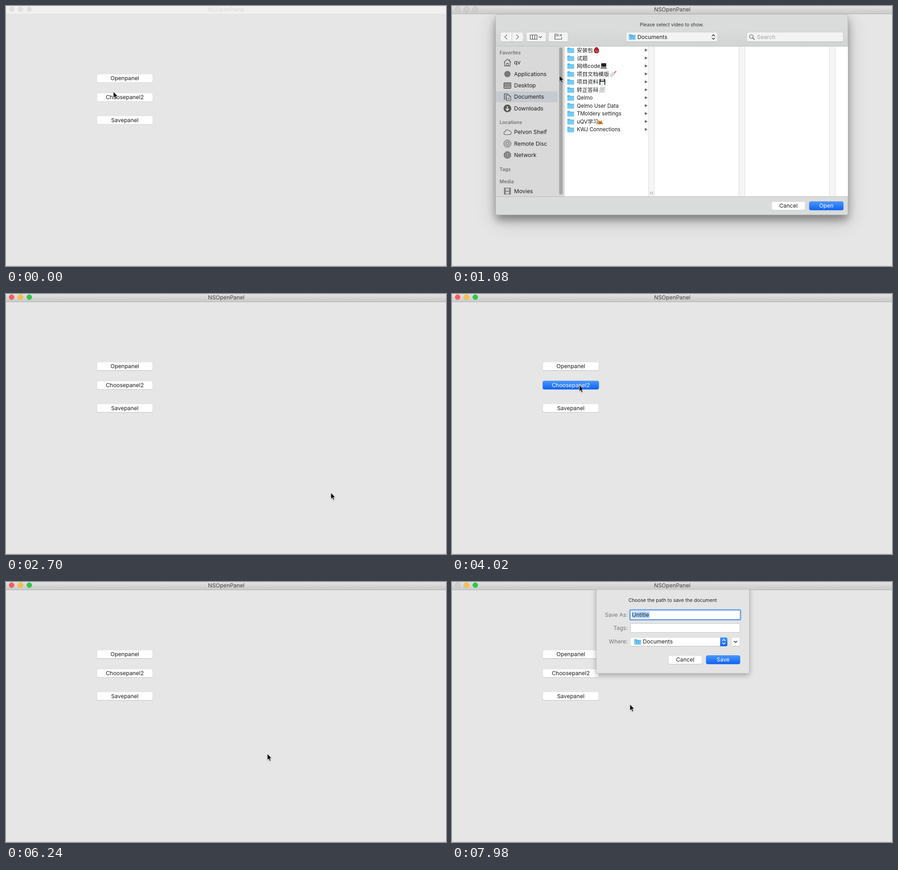
An HTML page for the animation above (8000 ms loop, 973 by 575 pixels).

```html
<!DOCTYPE html>
<html lang="en">
<head>
<meta charset="utf-8">
<title>File panels</title>
<style>
html, body { margin: 0; width: 100%; height: 100%; overflow: hidden; background: #e6e6e6; }
svg { display: block; width: 100%; height: 100%; }
text { font-family: Inter, "Noto Sans CJK SC", "Noto Sans CJK", sans-serif; white-space: pre; }
</style>
</head>
<body>
<svg id="stage" viewBox="0 0 973 575"></svg>
<script>
const stage = document.getElementById('stage');
const INK = '#1d1d1d';

// Markup helpers
const rect = (x, y, w, h, fill, extra = '') =>
  `<rect x="${x}" y="${y}" width="${w}" height="${h}" fill="${fill}" ${extra}/>`;
const circle = (x, y, r, fill, extra = '') =>
  `<circle cx="${x}" cy="${y}" r="${r}" fill="${fill}" ${extra}/>`;
const line = (d, color, w = 1, extra = '') =>
  `<path d="${d}" fill="none" stroke="${color}" stroke-width="${w}" ${extra}/>`;
const shape = (d, fill, extra = '') => `<path d="${d}" fill="${fill}" ${extra}/>`;
// y is the middle of the line of text
const label = (s, x, y, size = 12.3, fill = INK, extra = '') =>
  `<text x="${x}" y="${y + size * 0.36}" font-size="${size}" fill="${fill}" ${extra}>${s}</text>`;
const at = (x, y, body) => `<g transform="translate(${x} ${y})">${body}</g>`;
const MID = 'text-anchor="middle"';
const END = 'text-anchor="end"';
const ROUND = 'stroke-linecap="round" stroke-linejoin="round"';

const plate = (x, y, w, h, r = 3.5) =>
  rect(x, y + 0.7, w, h, '#b2b2b2', `rx="${r}"`) +
  rect(x, y, w, h, '#fff', `rx="${r}" stroke="#cfcfcf" stroke-width=".6"`);

// A push button with a white and a blue face; blueFirst marks the default one
const button = (id, text, x, y, w, h = 19, blueFirst = false) => {
  const cx = x + w / 2, cy = y + h / 2;
  const show = on => on ? '' : 'style="display:none"';
  return `<g id="${id}"><g class="white" ${show(!blueFirst)}>${plate(x, y, w, h)}` +
    label(text, cx, cy, 12.3, INK, MID) + `</g><g class="blue" ${show(blueFirst)}>` +
    rect(x, y, w, h, 'url(#blue)', 'rx="3.5" stroke="#2b78f0" stroke-width=".6"') +
    label(text, cx, cy, 12.3, '#fff', MID) + '</g></g>';
};

const folder = (x, y, w = 15) => at(x, y,
  shape(`M0 1Q0 0 1 0H5L6.5 1.6H${w - 1}Q${w} 1.6 ${w} 2.6V11Q${w} 12 ${w - 1} 12H1Q0 12 0 11Z`, '#56b5e8') +
  rect(0, 3, w, 9, '#76cbf7', 'rx="1"'));
const docFolder = (x, y) => folder(x, y) + at(x + 5, y + 4,
  line('M0 6V0H3L5 2V6', '#3b92d0', 1.1));

const upDown = (x, y, color) =>
  line(`M${x - 3} ${y - 2.3}l3 -3l3 3M${x - 3} ${y + 2.3}l3 3l3 -3`, color, 1.4, ROUND);

// Small pictures after some of the folder names
const pics = {
  bag: rect(1, 1, 11, 12, '#a82429', 'rx="4.5"') + rect(3, 6, 7, 5, '#d8434a', 'rx="1.5"') +
    line('M4 1.5Q6.5 -1 9 1.5', '#7c1518', 1.2),
  laptop: rect(2, 0, 11, 8, '#222', 'rx="1"') + shape('M1 9H13L15 12H0Z', '#6b6b6b'),
  tag: shape('M0 8L7 2L11 6L4 12L1 12Z', '#dedede', 'stroke="#a9a9a9" stroke-width=".6"') +
    line('M9 4L13 0', '#d8433f', 2),
  disk: rect(1, 0, 13, 13, '#32383e', 'rx="1"') + rect(4, 0, 7, 4, '#c9ced2') +
    rect(3, 6, 9, 7, '#eee'),
  page: shape('M3 0H14L12 9H1Z', '#e4e4e4', 'stroke="#aaa" stroke-width=".6"') +
    line('M4 3H11M3.5 6H11M0 11H13', '#999', 1),
  camp: shape('M0 12L5 2L9 12Z', '#d9a13a') + shape('M6 12L10 3L14 12Z', '#b9822c') +
    shape('M4 12Q5 7 7 5Q10 9 9 12Z', '#e2542f')
};

const rows = [
  ['安装包', 'bag', 313], ['试题'], ['网络code', 'laptop', 328],
  ['项目文档模版', 'tag', 350], ['项目资料', 'disk', 325], ['转正答辩', 'page', 325],
  ['Qelmo'], ['Qelmo User Data'], ['TMoldery settings'],
  ['uQV学习', 'camp', 320], ['KWJ Connections']
];
const fileRow = ([name, pic, px], i) => {
  const y = 98 + 17.53 * i;
  const size = /[\u4e00-\u9fff]/.test(name) ? 11.9 : 11.5;
  return folder(255, y - 6) + label(name, 276, y, size) +
    (pic ? at(px, y - 6.5, pics[pic]) : '') +
    shape(`M426.5 ${y - 3.7}L432.5 ${y - 0.4}L426.5 ${y + 3}Z`, '#666');
};

const GREY = '#575757';
const sideIcons = {
  home: line('M-8 0L0 -7.5L8 0M-6 -1V7.5H6V-1M-2 7V2H2V7M5 -3V-7', GREY, 1.3),
  apps: circle(0, 0, 7, '#777'),
  desk: rect(-8, -6.5, 16, 13, '#8c8c8c', `rx="1.5" stroke="${GREY}"`) +
    line('M-7 4H7', '#ddd', 1.2, 'stroke-dasharray="1.5 1"'),
  docs: shape('M-7 -7H0L3 -4V5H-7Z', '#a9abad', `stroke="${GREY}" stroke-width="1.2"`) +
    shape('M-2 -4H4L7.5 -0.5V8H-2Z', '#d3d6d9', `stroke="${GREY}" stroke-width="1.2"`) +
    line('M4 -4V-0.5H7.5M0 2.5H5M0 5H5', GREY, 1),
  down: circle(0, 0, 8.5, GREY) + line('M0 -5V4M-3.7 .8L0 4.5L3.7 .8', '#e2e2e2', 2),
  cloud: line('M-5 5.5A3.6 3.6 0 0 1 -5 -1.5A5 5 0 0 1 4 -3A4.3 4.3 0 0 1 5 5.5Z', GREY, 1.1),
  disc: circle(0, 0, 8, '#c4c4c4', `stroke="${GREY}"`) + circle(0, 0, 5, 'none', 'stroke="#888"') +
    circle(0, 0, 2.3, '#ddd', `stroke="${GREY}"`),
  net: circle(0, 0, 8.3, '#6d6d6d') +
    line('M-8 0H8M0 -8V8M-6 -5Q0 -1 6 -5M-6 5Q0 1 6 5M-3 -7Q-6 0 -3 7M3 -7Q6 0 3 7', '#c2c2c2', 0.8),
  film: rect(-7.5, -7.5, 15, 15, '#666') + rect(-4, -6.5, 8, 6, '#ccc') + rect(-4, 0.7, 8, 6, '#ccc') +
    line('M-5.8 -6V7M5.8 -6V7', '#ccc', 1.3, 'stroke-dasharray="1.5 1.5"')
};
const places = [
  ['home', 'qv', 125], ['apps', 'Applications', 150.5], ['desk', 'Desktop', 176],
  ['docs', 'Documents', 201], ['down', 'Downloads', 226.5],
  ['cloud', 'Pelvon Shelf', 279], ['disc', 'Remote Disc', 304.5], ['net', 'Network', 329.5]
];
const place = ([icon, name, y]) => at(122.5, y, sideIcons[icon]) + label(name, 137.3, y);
const heading = (s, y) => label(s, 105.3, y, 10.5, '#717171', 'font-weight="600"');

const toolbar = () => {
  const box = (x, w) => rect(x, 58.7, w, 21, '#b9bbba', 'rx="3.5"') +
    rect(x, 58, w, 20.8, '#f3f3f3', 'rx="3.5" stroke="#c5c7c6" stroke-width=".6"');
  return box(107, 50.5) + box(164.5, 43.5) + box(213.5, 43) + box(385, 202) +
    line('M132.5 58V79', '#c8c8c8') +
    line('M122 63.5L116.5 68.5L122 73.5M142 63.5L147.5 68.5L142 73.5', '#777', 1.3) +
    line('M173 64H188V73.5H173ZM178 64V73.5M183 64V73.5M192 67L195.3 70.2L198.6 67', '#444', 1.2) +
    line('M237 63.5H233L231.5 62H227.5V73.5H242.5V68.5M227.5 66H237M241 62V67M238.5 64.5H243.5', '#4d4d4d', 1.1) +
    docFolder(391, 62.5) + label('Documents', 410, 68.7) + upDown(578, 68.5, '#333') +
    box(652, 213) + circle(662, 67.5, 4, 'none', 'stroke="#555" stroke-width="1.2"') +
    line('M665 70.5L669 74.5', '#555', 1.4) + label('Search', 674.5, 68.7, 12.3, '#a3a3a3');
};

const panel = ({ id, message, cancel, ok, okText, media }) => {
  const body = extra => rect(96.5, 18, 779, 444, '#dadcdb', 'rx="4.5" ' + extra);
  const column = x => rect(x, 90, 14, 331, '#f5f5f5') +
    line(`M${x + 0.5} 90V421M${x + 13.5} 90V421`, '#dcdcdc');
  const extra = media ? heading('Media', 388) + place(['film', 'Movies', 409.5]) +
    `<g id="scroller">${rect(233.5, 90, 14.5, 331, '#d6d7d6')}` +
    rect(237, 92, 7.7, 325, '#a5a7a6', 'rx="3.8"') + '</g>' : '';
  return `<g id="${id}" style="display:none"><g clip-path="url(#below)">` +
    body('filter="url(#wide)"') + body('filter="url(#deep)"') + '</g>' +
    body('stroke="#a8a8a8" stroke-width=".7"') +
    rect(97, 50, 778, 39, 'url(#tools)') +
    label(message, 486, 41, 10.6, '#333', MID) + toolbar() +
    rect(97, 89, 151, 332, '#d9d9d9') + rect(248, 89, 627.5, 332, '#fff') +
    line('M97 89.3H875.5', '#c4c4c4') + line('M97 421.5H875.5', '#b9b9b9') +
    line('M248.3 89V421', '#c9c9c9') +
    rect(97, 189, 151, 24, '#c5cbd0') +
    heading('Favorites', 103.5) + heading('Locations', 257.5) + heading('Tags', 361) +
    places.map(place).join('') + extra +
    [434, 634, 834].map(column).join('') + line('M439 410.5V417M443 410.5V417', '#8c8c8c') +
    rows.map(fileRow).join('') +
    button(id + 'Cancel', 'Cancel', cancel[0], 432.5, cancel[1]) +
    button(id + 'Ok', okText, ok[0], 432.5, ok[1], 19, true) + '</g>';
};

const sheet = () => {
  const field = y => rect(394.5, y, 242, 19.5, '#fff', 'stroke="#bcbcbc" stroke-width=".8"');
  const name = (s, y) => label(s, 388.5, y, 12.3, '#777', END);
  return '<g clip-path="url(#below)"><g id="sheet">' +
    rect(319, 10, 338.5, 192, '#e4e4e4', 'filter="url(#soft)"') +
    rect(319, 10, 338.5, 192, '#e4e4e4', 'stroke="#b5b5b5" stroke-width=".7"') +
    label('Choose the path to save the document', 488, 40.3, 10.7, '#222', MID) +
    name('Save As:', 72.5) + name('Tags:', 102) + name('Where:', 132) +
    rect(393.5, 61.8, 244.5, 21.6, '#fff', 'rx="1.5" stroke="#6fa4e8" stroke-width="3"') +
    rect(397.5, 65, 39.5, 15, '#b3d5fb') + label('Untitle', 398, 72.5) + field(92) +
    plate(394.5, 122.7, 214, 19) + docFolder(403, 126.5) + label('Documents', 422, 132) +
    shape('M593 122.5H605.5Q609 122.5 609 126V138.5Q609 142 605.5 142H593Z', 'url(#blue)') +
    upDown(601, 132.2, '#fff') +
    plate(617.5, 122.7, 19, 19) + line('M624 130.7L627.2 133.9L630.4 130.7', '#333', 1.5, ROUND) +
    button('sheetCancel', 'Cancel', 478.5, 162.5, 74.5) +
    button('sheetSave', 'Save', 562, 162.5, 75, 19, true) + '</g></g>';
};

const gradient = (id, from, to) => `<linearGradient id="${id}" x2="0" y2="1">` +
  `<stop stop-color="${from}"/><stop offset="1" stop-color="${to}"/></linearGradient>`;
const shadow = (id, dy, blur, alpha) => `<filter id="${id}" x="-20%" y="-20%" width="140%" height="150%">` +
  `<feDropShadow dx="0" dy="${dy}" stdDeviation="${blur}" flood-color="#000" flood-opacity="${alpha}"/></filter>`;

stage.innerHTML = '<defs>' +
  gradient('bar', '#e1e1e1', '#cacaca') + gradient('blue', '#4a97fa', '#0f62f3') +
  gradient('tools', '#dadcdb', '#d2d4d3') +
  shadow('wide', 14, 21, 0.2) + shadow('deep', 11, 9, 0.34) +
  shadow('soft', 4, 6, 0.3) + shadow('tip', 1, 1, 0.3) +
  '<clipPath id="below"><rect y="17.5" width="973" height="558"/></clipPath></defs>' +
  rect(0, 0, 973, 575, '#e6e6e6') + rect(0, 574, 973, 1, '#d0d0d0') +
  rect(0, 0, 973, 17, '#f0f0f0', 'id="bar1"') + rect(0, 17, 973, 1, '#b4b4b4', 'id="edge"') +
  [12.5, 32, 51.5].map((x, i) => circle(x, 7, 5.8, '#dfdfdf', `id="light${i}" stroke-width=".7"`)).join('') +
  label('NSOpenPanel', 487, 7.2, 12.3, '#444', 'id="title" ' + MID) +
  button('open', 'Openpanel', 200.7, 150.3, 124, 18.7) +
  button('choose', 'Choosepanel2', 200.7, 192.2, 124, 18.7) +
  button('save', 'Savepanel', 200.7, 242.8, 124, 18.7) +
  panel({ id: 'video', message: 'Please select video to show.', cancel: [707, 74], ok: [790, 75.5], okText: 'Open', media: true }) +
  panel({ id: 'folder', message: 'Please select a directory to show.', cancel: [697, 79], ok: [785, 80.5], okText: 'Choose' }) +
  sheet() +
  '<g id="cursor">' + circle(0, 0, 21.5, 'none', 'id="ring" stroke="#222" stroke-width="1.5"') +
  shape('M.5 .7V14.3L3.6 11.5L5.7 16.6L8.1 15.6L6 10.6H10.1Z', '#000',
    'stroke="#fff" stroke-width=".8" filter="url(#tip)"') + '</g>';

const el = {};
stage.querySelectorAll('[id]').forEach(n => { el[n.id] = n; });

const path = [
  [0, 237, 189], [240, 237, 153], [1080, 237, 153], [1860, 671, 401], [2280, 718, 439],
  [2700, 718, 439], [3240, 292, 219], [3600, 281, 201], [4260, 281, 201], [5040, 284, 207],
  [5220, 271, 150], [5400, 300, 119], [5760, 722, 443], [5940, 722, 443], [6720, 284, 250],
  [6900, 284, 244], [7140, 284, 244], [7500, 372, 289], [7860, 372, 289], [7980, 393, 270]
];
const clicks = [[480, 600], [780, 900], [2460, 2580], [3780, 4020], [5820, 5940], [6960, 7080]];
const LIGHTS = ['#fc5b57', '#fdbe41', '#2bca44'];

const within = (t, a, b) => t >= a && t < b;
const ramp = (t, a, b) => Math.min(1, Math.max(0, (t - a) / (b - a)));
const ease = k => k * k * (3 - 2 * k);
const show = (node, on) => { node.style.display = on ? '' : 'none'; };
const setBlue = (id, on) => {
  show(el[id].querySelector('.white'), !on);
  show(el[id].querySelector('.blue'), on);
};

function cursorAt(t) {
  const i = path.findIndex(p => p[0] > t);
  if (i < 0) return path[path.length - 1].slice(1);
  const [t0, x0, y0] = path[i - 1], [t1, x1, y1] = path[i];
  const k = t1 - t0 > 300 ? ease(ramp(t, t0, t1)) : ramp(t, t0, t1);
  return [x0 + (x1 - x0) * k, y0 + (y1 - y0) * k];
}

function draw(t) {
  const active = t >= 480;
  const video = within(t, 1080, 2580), folderOpen = within(t, 4260, 5940);
  const modal = video || folderOpen, saving = t >= 7140;

  el.bar1.setAttribute('fill', active ? 'url(#bar)' : '#f0f0f0');
  show(el.edge, active);
  el.title.setAttribute('fill', active ? '#444' : '#d9d9d9');
  LIGHTS.forEach((color, i) => {
    const off = modal || (saving && i === 0);
    const node = el['light' + i];
    node.setAttribute('fill', !active ? '#dfdfdf' : off ? '#cecece' : color);
    node.setAttribute('stroke', !active ? 'none' : off ? '#b6b6b6' : 'rgba(0,0,0,.12)');
  });
  ['open', 'choose', 'save'].forEach(id => {
    el[id].querySelector('rect').style.opacity = active ? 1 : 0;
  });

  setBlue('open', within(t, 780, 1080));
  setBlue('choose', within(t, 3780, 4260));
  setBlue('save', within(t, 6960, 7140));
  show(el.video, video);
  show(el.folder, folderOpen);
  const cancelVideo = t >= 2460, cancelFolder = t >= 5820;
  setBlue('videoCancel', cancelVideo);
  setBlue('videoOk', !cancelVideo);
  setBlue('folderCancel', cancelFolder);
  setBlue('folderOk', !cancelFolder);
  el.scroller.style.opacity = 1 - ramp(t, 1500, 1740);

  show(el.sheet, saving);
  const lift = -190 * (1 - ease(ramp(t, 7080, 7320)));
  el.sheet.setAttribute('transform', `translate(0 ${lift})`);

  const [x, y] = cursorAt(t);
  el.cursor.setAttribute('transform', `translate(${x} ${y})`);
  show(el.ring, clicks.some(([a, b]) => within(t, a, b)));
}

const LOOP = 8000, STEP = 60;
let start = null;
function tick(now) {
  if (start === null) start = now;
  const t = (now - start) % LOOP;
  draw(Math.floor(t / STEP) * STEP);
  requestAnimationFrame(tick);
}
draw(0);
requestAnimationFrame(tick);
</script>
</body>
</html>
```
